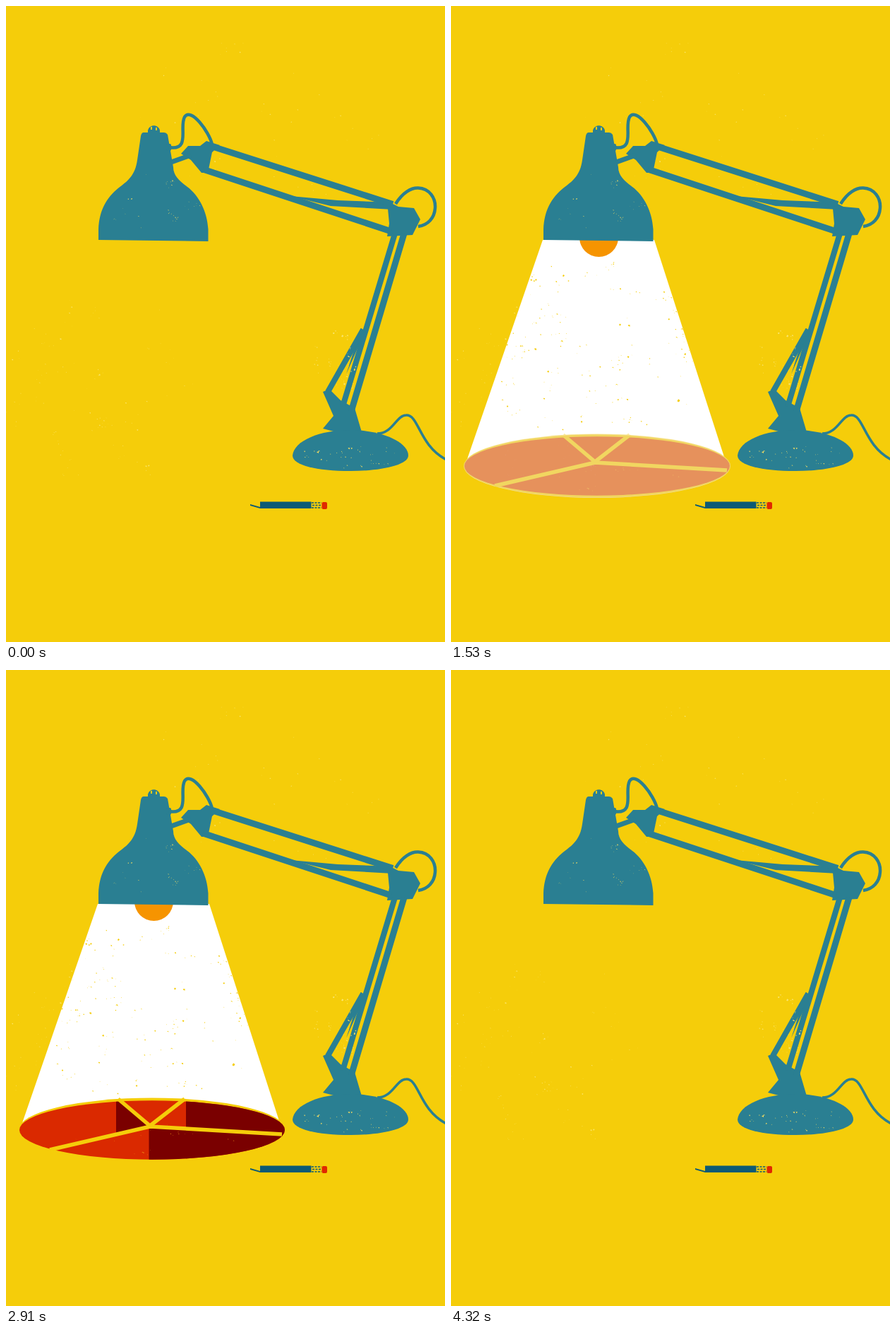
An HTML page for the animation above (4.5 s loop, 622 by 900 pixels).

```html
<!DOCTYPE html>
<html lang="en">
<head>
<meta charset="utf-8">
<title>Desk lamp</title>
<style>
  html, body { margin: 0; width: 100%; height: 100%; overflow: hidden; background: #f5cd0a; }
  svg { display: block; width: 100%; height: 100%; }
  .teal { fill: #2a7f92; }
  .rod { fill: none; stroke: #2a7f92; }
  .yellow { fill: #f5cd0a; }
</style>
</head>
<body>
<svg viewBox="0 0 622 900">
  <defs>
    <path id="cone" d="M130 331H288L387 638A189 45 0 0 0 23 641Z"/>
    <clipPath id="beam"><use href="#cone"/></clipPath>
    <clipPath id="disc"><ellipse cx="207" cy="651" rx="188" ry="41.700"/></clipPath>
  </defs>
  <rect class="yellow" width="622" height="900"/>
  <path id="dust" fill="#fae56f"/>

  <g id="light">
    <use id="glow" href="#cone" fill="#fff"/>
    <ellipse id="pool" cx="207" cy="651" rx="189" ry="45" fill="#eee6ea"/>
    <path id="grain" class="yellow" clip-path="url(#beam)"/>
    <g id="pie">
      <ellipse class="yellow" cx="207" cy="650.500" rx="189" ry="45"/>
      <g clip-path="url(#disc)">
        <rect x="18" y="605" width="380" height="92" fill="#da2900"/>
        <path id="shadow" fill="#7a0000" d="M156 605L204 646L156 657ZM255 605H400V657L255 649ZM202.500 646L400 657V697H202.500Z"/>
        <path id="flecks" fill="#f5a51a"/>
      </g>
      <path d="M159 607L204 645L253 607M391 657L204 646L62 679" fill="none" stroke="#f5cd0a" stroke-width="5.500"/>
    </g>
    <circle id="bulb" cx="209.500" cy="327.500" r="27.500" fill="#f69400"/>
  </g>

  <g class="teal">
    <!-- shade and cap -->
    <path d="M195 179Q192 179 191 184L186 218C183 240 172 248 160 257C142 271 132 290 131 316V331L286.500 333V316C285 290 273 268 257 256C246 248 237 240 237 228L229 182Q227 179 224 179Z"/>
    <path d="M201 181V176C203 167 216 167 218 176V181Z"/>
    <rect x="227" y="195" width="7" height="10" rx="2"/>
    <!-- head joint, spring, elbow -->
    <path d="M248 209L258 198H275L284 191L303 197L292 207L286 236H277L262 218Z"/>
    <path d="M403 269L470 275L548 278V288L460 283Z"/>
    <path d="M540 276L556 284L578 286L587 302L576 324L540 326L543 308Z"/>
    <!-- lower spring, foot joint, base -->
    <path d="M503 456L509 460L482 521Z"/>
    <path d="M449 546L458 542L474 558L494 569L504 603H468L449 598L464 580Z"/>
    <path d="M406 636C408 615 445 600 488 600C532 600 570 617 570 636C570 650 530 658 488 658C440 658 406 650 406 636Z"/>
  </g>
  <g class="rod">
    <path stroke-width="9" d="M296 200L548 280.500M279 231L546 319M564 322L489 574"/>
    <path stroke-width="8" d="M551 322L477 567M506 458L456 546"/>
    <path stroke-width="7" d="M234 221L262 211"/>
    <path stroke-width="4.500" d="M231 200C262 205 245 172 253 157C262 143 288 178 292 196M552 280C562 264 574 257 584 257.500C600 258 609 272 608 286C607 300 598 310 584 312"/>
    <path stroke-width="3.500" d="M526 605C548 605 553 579 567 579C585 578 585 622 624 642"/>
  </g>
  <path d="M206 175V171M213 176V172" stroke="#f5cd0a" stroke-width="2"/>
  <path id="wear" fill="#f3dc62"/>

  <!-- pencil -->
  <g fill="#0d5a75">
    <rect x="360" y="701.500" width="72.500" height="9.500"/>
    <path d="M346 705L360 709V711L346 707Z"/>
    <path d="M433 703H447M433 710H447M434 706.500H447" stroke="#0d5a75" stroke-width="1.600" stroke-dasharray="3 1.500"/>
    <rect x="447.500" y="702" width="7.500" height="10" rx="2" fill="#e02800"/>
  </g>
  <rect id="edge" x=".5" y=".5" width="621" height="899" fill="none" stroke="#f9df66"/>
</svg>
<script>
const LOOP = 4500, STEP = 30;
const el = id => document.getElementById(id);

let seed = 11;
const rand = () => (seed = seed * 16807 % 2147483647) / 2147483647;
const spread = range => (rand() + rand() - 1) * range;

// One irregular sliver, mostly small.
function speck(x, y, size) {
  const r = size * (0.3 + rand() * rand()), tilt = spread(r);
  return `M${x} ${y}l${r} ${tilt}l${-tilt} ${r}l${-r} ${-r / 2}z`;
}

// Worn print: loose clusters of specks inside an ellipse.
function wear(id, x, y, rx, ry, clusters, size) {
  let d = el(id).getAttribute('d') || '';
  for (let i = 0; i < clusters; i++) {
    const angle = rand() * 2 * Math.PI, reach = Math.sqrt(rand());
    const cx = x + rx * reach * Math.cos(angle), cy = y + ry * reach * Math.sin(angle);
    const count = 1 + Math.floor(rand() * rand() * 8);
    for (let j = 0; j < count; j++) {
      d += speck(cx + spread(rx / 9), cy + spread(ry / 9), size);
    }
  }
  el(id).setAttribute('d', d);
}

wear('dust', 350, 190, 190, 140, 28, 1.6);
wear('dust', 130, 530, 150, 140, 40, 1.6);
wear('dust', 465, 510, 32, 55, 22, 1.8);
wear('grain', 205, 490, 165, 130, 80, 2.2);
wear('flecks', 207, 655, 150, 30, 9, 1.5);
wear('wear', 210, 280, 65, 45, 14, 1.4);
wear('wear', 490, 510, 9, 36, 9, 1.6);
wear('wear', 488, 636, 74, 17, 24, 1.9);

const ramp = (t, start, length) => Math.min(1, Math.max(0, (t - start) / length));
const easeOut = x => 1 - (1 - x) ** 2;
const show = (id, opacity) => el(id).setAttribute('opacity', opacity.toFixed(3));

function draw(time) {
  const t = Math.floor(time % LOOP / STEP) * STEP;
  const glow = easeOut(ramp(t, 720, 840));
  const fade = 1 - ramp(t, 3750, 570);
  show('glow', glow);
  show('grain', glow);
  show('pool', glow * (1 - ramp(t, 1290, 720)));
  show('bulb', ramp(t, 690, 210));
  show('pie', easeOut(ramp(t, 1290, 1020)));
  show('shadow', easeOut(ramp(t, 2310, 600)));
  show('light', fade);
  show('edge', t < 3750 ? 0 : fade * 0.7);
}

const start = performance.now();
function tick() {
  draw(performance.now() - start);
  requestAnimationFrame(tick);
}
tick();
</script>
</body>
</html>
```
